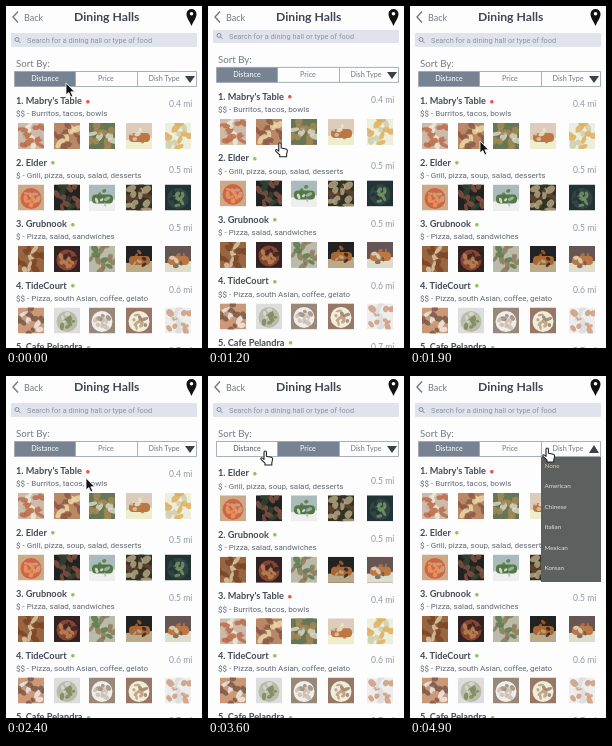
Animation of 196 by 342 pixels, one loop 5 s. Source, as an HTML page:

```html
<!DOCTYPE html>
<html lang="en">
<head>
<meta charset="utf-8">
<title>Dining Halls</title>
<style>
  html, body { margin: 0; width: 100%; height: 100%; overflow: hidden; background: #fdfdfd; }
  svg { display: block; }
  #stage { width: 100vw; height: 100vh; }
  text { font-family: Lato, sans-serif; fill: #727985; }
  .heading { font-size: 12.2px; font-weight: 700; fill: #3f4654; }
  .name { font-size: 9.2px; font-weight: 700; fill: #434a58; }
  .dot { font: 4.8px "DejaVu Sans", sans-serif; }
  .desc { font: 8px Roboto, sans-serif; fill: #626873; }
  .hint { font: 7.4px Roboto, sans-serif; fill: #8d94a2; }
  .miles { font-size: 8.6px; fill: #9298a3; }
  .tab { font-size: 7.2px; text-anchor: middle; }
  .option { font-size: 6.3px; fill: #dfe0d8; }
</style>
</head>
<body>
<svg id="stage" viewBox="0 0 196 342">
  <rect width="196" height="342" fill="#fdfdfd"/>
  <g id="page">
    <rect x="5" y="27" width="186" height="14" rx="1" fill="#e0e3ec"/>
    <g fill="none" stroke="#7d8594" stroke-width=".9"><circle cx="11" cy="33.5" r="2"/><path d="M12.5 35l2 2"/></g>
    <text class="hint" x="21" y="36.7">Search for a dining hall or type of food</text>
    <text x="10" y="61" font-size="9.7">Sort By:</text>
    <rect id="selected" y="65.5" width="61" height="15" fill="#778393"/>
    <path d="M8.5 65.5h182v15h-182zM69.5 65.5v15M131.5 65.5v15" fill="none" stroke="#a0a6b0" stroke-width=".9"/>
    <text class="tab" x="39" y="75.3">Distance</text>
    <text class="tab" x="100" y="75.3">Price</text>
    <text class="tab" x="158" y="75.3">Dish Type</text>
    <path id="caret" fill="#3c4047"/>
    <g id="byDistance"></g>
    <g id="byPrice"></g>
  </g>
  <g id="menu"><rect x="131" y="81" width="60" height="125" fill="#5c615f"/></g>
  <rect width="196" height="24" fill="#fdfdfd"/>
  <path d="M12 5.5L7 11l5 5.5" fill="none" stroke="#727985" stroke-width="1.4"/>
  <text x="18" y="14.5" font-size="9">Back</text>
  <text class="heading" x="68" y="15">Dining Halls</text>
  <path d="M185.5 20C183.5 15 180.5 12 180.5 8a5 5 0 0 1 10 0C190.5 12 187.5 15 185.5 20z" fill="#111"/>
  <circle cx="185.5" cy="7.8" r="1.8" fill="#fff"/>
  <g id="cursor" stroke-linejoin="round">
    <path id="arrow" d="M0 0v12l2.8-2.5 2 4.5 2-.9-2-4.3h3.8z" fill="#111" stroke="#fff" stroke-width=".8"/>
    <path id="hand" d="M-1 1.2a1.2 1.2 0 0 1 2.4 0v4l5 1c1 .3 1.300 1 1.200 2L6.8 12v2H0v-1.8L-4 8.300c-.6-1 .6-2 1.500-1.200L-1 8.300z" fill="#fff" stroke="#222" stroke-width="1.1"/>
  </g>
</svg>
<script>
const $ = id => document.getElementById(id);
const RED = '#e05a50', GREEN = '#8cc75c';

// Each photo is a layout (o plate, = layers, * scatter) with three colours.
const halls = [
  { name: "Mabry's Table", desc: '$$ - Burritos, tacos, bowls', miles: '0.4', dy: 3.4, dot: RED,
    photos: ['* cba eed b64', '* b86 eda 854', '* 675 ddc a85', '= dcb eec b74', '* eed cca da5'] },
  { name: 'Elder', desc: '$ - Grill, pizza, soup, salad, desserts', miles: '0.5', dy: 7.4, dot: GREEN,
    photos: ['o ca8 c64 e96', '* 222 343 854', '= abb eee 574', '* 332 643 ba8', 'o 233 344 796'] },
  { name: 'Grubnook', desc: '$ - Pizza, salad, sandwiches', miles: '0.5', dy: 4.4, dot: GREEN,
    photos: ['* 964 dca 742', 'o 322 843 b85', '* bba 574 875', '= 222 ba8 a63', '= 655 ddc b74'] },
  { name: 'TideCourt', desc: '$$ - Pizza, south Asian, coffee, gelato', miles: '0.6', dy: 4.4, dot: GREEN,
    photos: ['* c97 eee 754', 'o ddd bba 785', 'o 987 eee cba', 'o 976 eed b97', '* eee ddd c97'] },
  { name: 'Cafe Pelandra', desc: '$$ - Ramen, poke bowls, sushi', miles: '0.7', dy: 4.4, dot: GREEN,
    photos: ['o 543 ccb b85', '* 322 765 c95', 'o 322 ccc 876', '= 333 bbb 654', 'o 322 998 c85'] }
];
const columns = [12, 48, 83, 120, 159];

const fraction = n => { const v = Math.sin(n * 127.1) * 43758.5; return v - Math.floor(v); };

function blobs(count, fills, cx, cy, spread, size, seed) {
  return Array.from({ length: count }, (_, i) => {
    const angle = i * 2.4 + seed, reach = spread * Math.sqrt((i + .5) / count);
    const x = cx + reach * Math.cos(angle), y = cy + reach * Math.sin(angle);
    const rx = size * (.7 + fraction(seed + i)), ry = size * (.5 + fraction(seed + i * 3) / 2);
    return `<ellipse cx="${x}" cy="${y}" rx="${rx}" ry="${ry}" fill="#${fills[i % fills.length]}" opacity=".8" transform="rotate(${angle * 40} ${x} ${y})"/>`;
  }).join('');
}

function photo(colours, x, y, seed) {
  const [layout, back, plate, food] = colours.split(' ');
  const layouts = {
    'o': () => `<circle cx="13" cy="14" r="10.5" fill="#${plate}"/>` + blobs(9, [food, food, back], 13, 14, 7.5, 2.4, seed),
    '=': () => `<path d="M0 17l26-2v11H0z" fill="#${plate}"/><rect x="3" y="10" width="21" height="9" rx="4" fill="#${food}"/>` +
      blobs(6, [plate, food, back], 13, 13, 8, 2, seed),
    '*': () => blobs(16, [plate, food, back, food], 13, 13, 14, 3.6, seed)
  };
  return `<svg x="${x}" y="${y}" width="26" height="26"><rect width="26" height="26" fill="#${back}"/>${layouts[layout]()}</svg>`;
}

function list(order, shift) {
  return order.map((id, i) => {
    const hall = halls[id], y = 98 + 61.5 * i + (i < 3 ? shift : 0);
    return `<text class="name" x="10" y="${y}">${i + 1}. ${hall.name}<tspan class="dot" dx="4" dy="-1.4" style="fill:${hall.dot}">●</tspan></text>
      <text class="desc" x="10" y="${y + 12.3}">${hall.desc}</text>
      <text class="miles" x="163" y="${y + hall.dy}">${hall.miles} mi</text>` +
      hall.photos.map((p, k) => photo(p, columns[k], y + 19, id * 5 + k + 1)).join('');
  }).join('');
}

$('byDistance').innerHTML = list([0, 1, 2, 3, 4], 0);
$('byPrice').innerHTML = list([1, 2, 0, 3, 4], 2.3);
$('menu').innerHTML += ['None', 'American', 'Chinese', 'Italian', 'Mexican', 'Korean']
  .map((label, i) => `<text class="option" x="134.5" y="${92 + 20.4 * i}"${i ? '' : ' style="fill:#d8cf9a"'}>${label}</text>`).join('');

// Cursor stops: time, x, y.
const stops = [
  [0, 60, 77], [600, 66, 117], [1000, 72, 137], [1900, 70, 135], [2400, 80, 102],
  [2650, 80, 102], [3000, 87, 76], [3200, 87, 76], [3600, 57, 75], [4400, 57, 75],
  [4700, 137, 72], [5000, 137, 72]
];
const ease = u => u * u * (3 - 2 * u);
const ramp = (t, from, to) => ease(Math.min(1, Math.max(0, (t - from) / (to - from))));
const show = (id, on) => $(id).setAttribute('display', on ? 'inline' : 'none');
const move = (id, x, y) => $(id).setAttribute('transform', `translate(${x} ${y})`);
const tabs = document.querySelectorAll('.tab');

function draw(t) {
  const byPrice = t >= 3100 && t < 3900;
  const open = t >= 4900;
  const scrolled = t >= 1150 && t < 1900;

  move('page', 0, scrolled ? -64 * ramp(t, 1150, 1480) : 0);
  show('byDistance', !byPrice);
  show('byPrice', byPrice);
  show('menu', open);
  $('selected').setAttribute('x', byPrice ? 70 : 8.5);
  tabs[0].style.fill = byPrice ? '#4a5261' : '#fff';
  tabs[1].style.fill = byPrice ? '#fff' : '#727985';
  $('caret').setAttribute('d', open ? 'M179 77h10l-5-8z' : 'M179 70h10l-5 7z');

  const next = stops.findIndex(stop => stop[0] > t);
  const [t0, x0, y0] = stops[next - 1], [t1, x1, y1] = stops[next];
  const u = ramp(t, t0, t1);
  move('cursor', x0 + (x1 - x0) * u, y0 + (y1 - y0) * u);
  const pointing = scrolled || t >= 2850;
  show('hand', pointing);
  show('arrow', !pointing);
}

const start = performance.now();
function tick() {
  draw((performance.now() - start) % 5000);
  requestAnimationFrame(tick);
}
tick();
</script>
</body>
</html>
```
